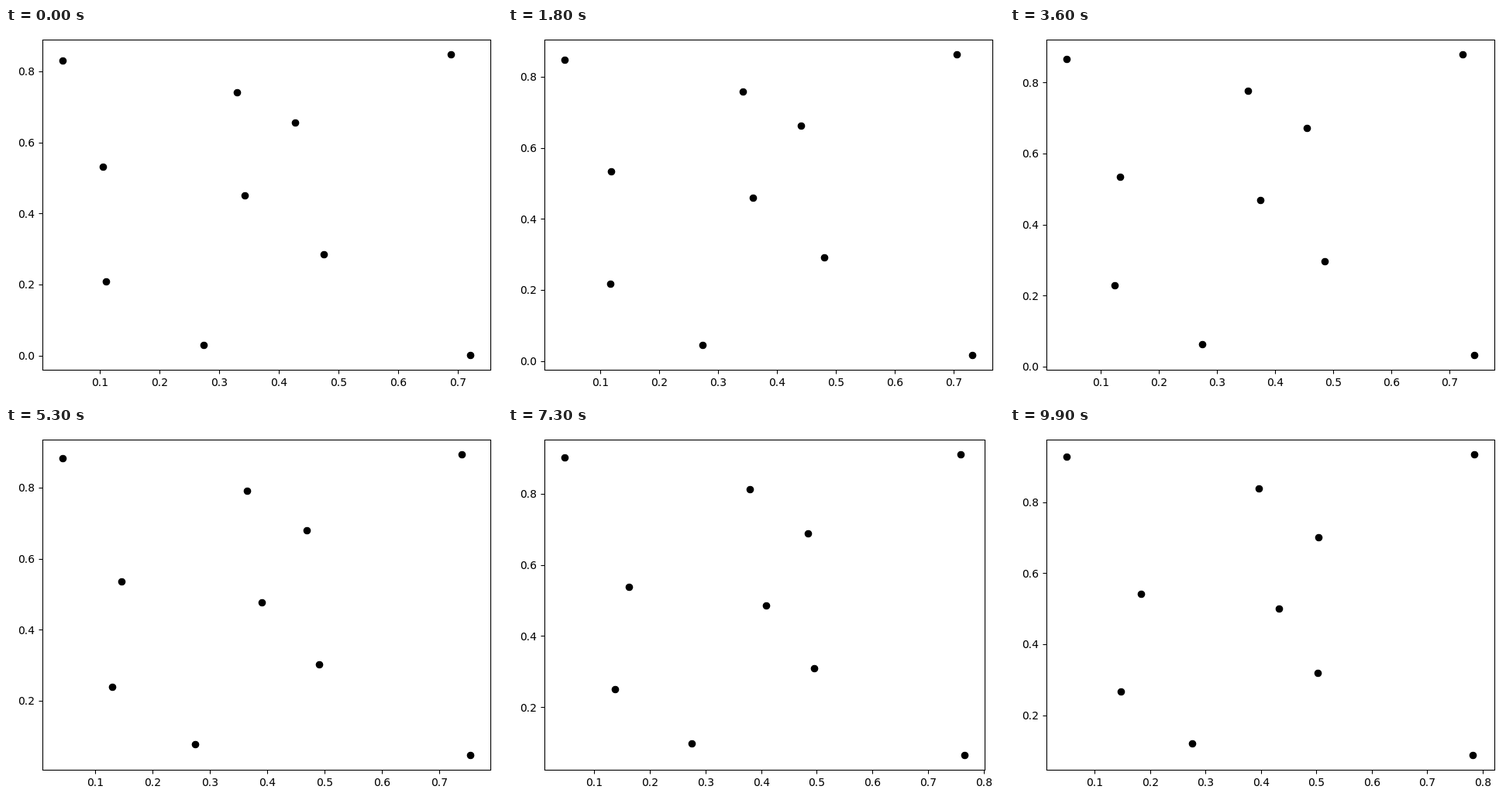
Animation of 640x480 px, one loop 10 s. Source, as an HTML page with a canvas:

```html
<!DOCTYPE html>
<html>
<head>
<meta charset="utf-8">
<title>Drifting scatter plot</title>
<style>
  html, body { margin: 0; width: 100%; height: 100%; overflow: hidden; background: #fff; }
  canvas { display: block; }
</style>
</head>
<body>
<canvas id="plot" width="640" height="480"></canvas>
<script>
const ctx = document.getElementById('plot').getContext('2d');
const STEPS = 100, STEP_MS = 100;
const LEFT = 47.1, RIGHT = 625, TOP = 15, BOTTOM = 441.1;
const LAST_LABEL_X = 613.8; // furthest place where a tick label still fits
const PAD = 0.05, TICK = 5;

// Key points: start x, y and the drift in x, y over one loop
const points = [
  [.0381, .8302, .0115, .0974],
  [.1048, .5317, .0785, .0100],
  [.1105, .2081, .0369, .0580],
  [.2739, .0296, .0019, .0911],
  [.3296, .7400, .0670, .0980],
  [.3428, .4507, .0895, .0487],
  [.4274, .6552, .0766, .0456],
  [.4756, .2844, .0273, .0350],
  [.6879, .8468, .0965, .0866],
  [.7204, .0018, .0619, .0866]
];

function limits(values) {
  const lo = Math.min(...values), hi = Math.max(...values), pad = (hi - lo) * PAD;
  return [lo - pad, hi + pad];
}

function ticks([lo, hi], step) {
  const list = [];
  for (let i = Math.ceil(lo / step); i * step <= hi; i++) list.push(i * step);
  return list;
}

const share = (v, [lo, hi]) => (v - lo) / (hi - lo);
const snap = v => Math.round(v) + 0.5;

function line(x1, y1, x2, y2) {
  ctx.beginPath();
  ctx.moveTo(x1, y1);
  ctx.lineTo(x2, y2);
  ctx.stroke();
}

// The leading digit sits one pixel closer to the decimal point
function label(value, x, y) {
  const text = value.toFixed(1);
  ctx.fillText(text[0], x + 1, y);
  ctx.fillText(text.slice(1), x + ctx.measureText(text[0]).width, y);
}

function draw(step) {
  const k = step / (STEPS - 1);
  const now = points.map(([x, y, dx, dy]) => [x + dx * k, y + dy * k]);
  const xLim = limits(now.map(p => p[0])), yLim = limits(now.map(p => p[1]));
  const xTicks = ticks(xLim, 0.1), yTicks = ticks(yLim, 0.2);

  // The axes narrow when the last label would pass the margin
  const lastShare = share(xTicks[xTicks.length - 1], xLim);
  const right = Math.min(RIGHT, LEFT + (LAST_LABEL_X - LEFT) / lastShare);
  const toX = x => LEFT + share(x, xLim) * (right - LEFT);
  const toY = y => BOTTOM - share(y, yLim) * (BOTTOM - TOP);

  ctx.fillStyle = '#fff';
  ctx.fillRect(0, 0, 640, 480);
  ctx.fillStyle = ctx.strokeStyle = '#000';
  ctx.lineWidth = 1.11;
  ctx.font = '13.89px "DejaVu Sans", sans-serif';

  for (const [x, y] of now) {
    ctx.beginPath();
    ctx.arc(snap(toX(x)), snap(toY(y)), 4.86, 0, 2 * Math.PI);
    ctx.fill();
  }

  const l = snap(LEFT), b = snap(BOTTOM), t = snap(TOP);
  ctx.strokeRect(l, t, snap(right) - l, b - t);
  for (const v of xTicks) {
    const x = toX(v);
    line(snap(x), b, snap(x), b + TICK);
    label(v, Math.round(x - 11), 462);
  }
  for (const v of yTicks) {
    const y = toY(v);
    line(l, snap(y), l - TICK, snap(y));
    label(v, 15, Math.round(y + 5.37));
  }
}

const start = performance.now();
function tick() {
  draw(Math.floor((performance.now() - start) / STEP_MS) % STEPS);
  requestAnimationFrame(tick);
}
tick();
</script>
</body>
</html>
```
